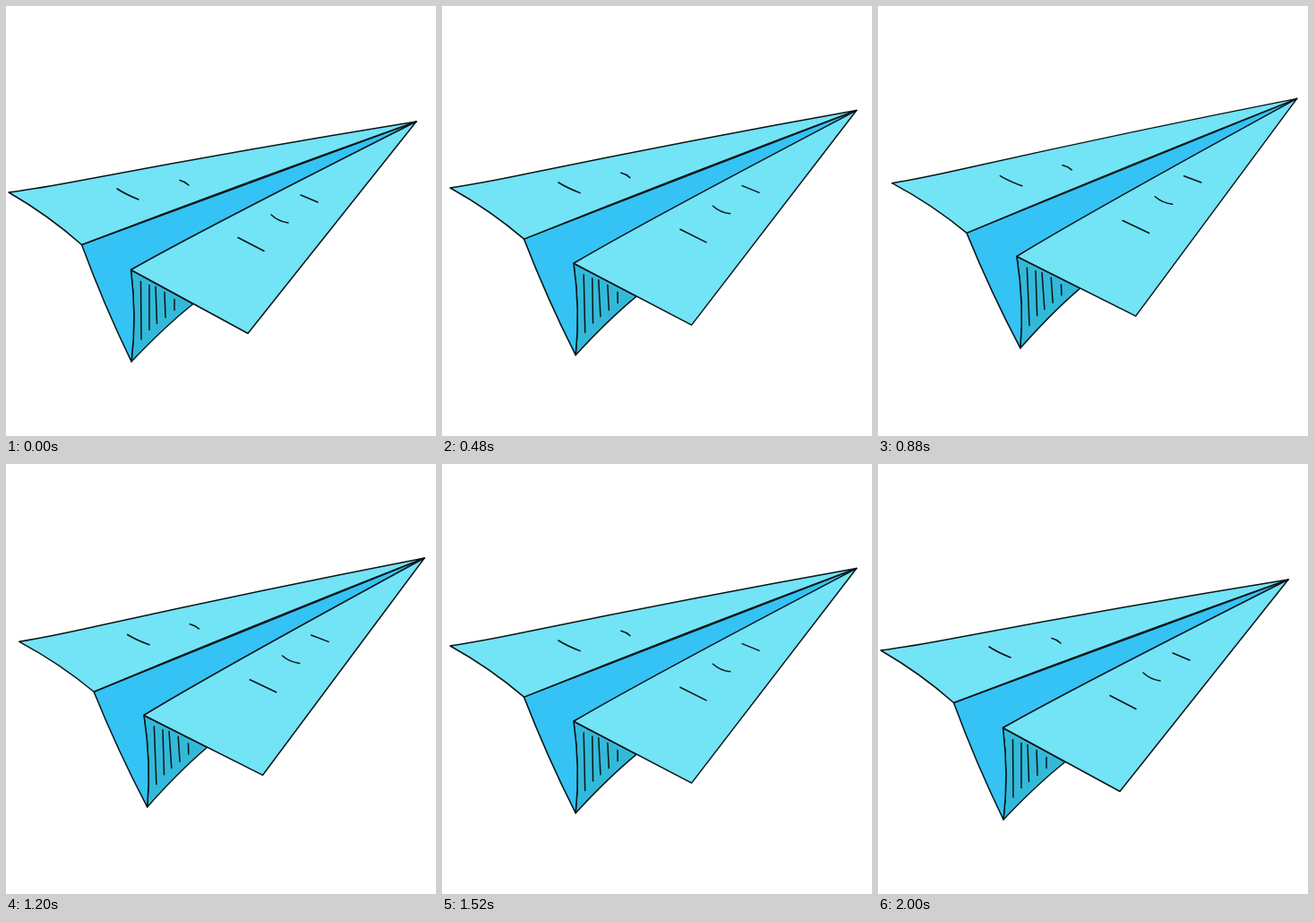
Write an HTML page that moves like this. It is 480 by 480 pixels and loops after 2040 ms.

```html
<!DOCTYPE html>
<html lang="en">
<head>
<meta charset="utf-8">
<title>Paper plane</title>
<style>
  html, body { margin: 0; width: 100%; height: 100%; overflow: hidden; background: #fff; }
  svg { display: block; width: 100vw; height: 100vh; }
  #plane { stroke: #0b1417; stroke-width: 1.5; stroke-linecap: round; stroke-linejoin: round; }
  .wing { fill: #73e3f6; }
  .body { fill: #34c3f4; }
  .keel { fill: #32b9d9; }
  .marks { fill: none; }
</style>
</head>
<body>
<svg viewBox="0 0 480 480">
  <g id="plane">
    <path class="keel" d="M139.500 294.500L209 332.500Q177 358 140 397Q146 348 139.500 294.500Z"/>
    <path class="body" d="M84.500 266.500L458 129L139.500 294.500Q146 348 140 397Q109 333 84.500 266.500Z"/>
    <path class="wing" d="M458 129Q270 159.500 90 193.500Q35 204 3 208Q48 234 84.500 266.500Q270 196 458 129Z"/>
    <path class="wing" d="M458 129Q210 254 139.500 294.500L270 365.500Z"/>
    <g class="marks">
      <path d="M124 204Q134 210.500 148 216M194 194.500Q200 196 204 200"/>
      <path d="M329 211L348 219M296 233Q304 240.500 315 242M259 258.500L288 273.500"/>
      <path d="M150.500 307.500L151 372M160 311.500L160 361.500M167 313.500L168.500 354.500M177 319.500L178 347.500M188 327.500L188 339.500"/>
    </g>
  </g>
</svg>
<script>
  const LOOP = 2040, STEP = 40, RISE = 1000;
  const plane = document.getElementById("plane");

  // Eased rise and fall, held for one step at each pose.
  function draw(now) {
    const t = Math.floor((now % LOOP) / STEP) * STEP;
    const lift = (1 - Math.cos(Math.PI * t / RISE)) / 2;
    plane.setAttribute("transform",
      `translate(${14 * lift} ${-19 * lift}) rotate(${-2 * lift} 240 240)`);
  }

  function tick() {
    draw(performance.now());
    requestAnimationFrame(tick);
  }
  tick();
</script>
</body>
</html>
```
